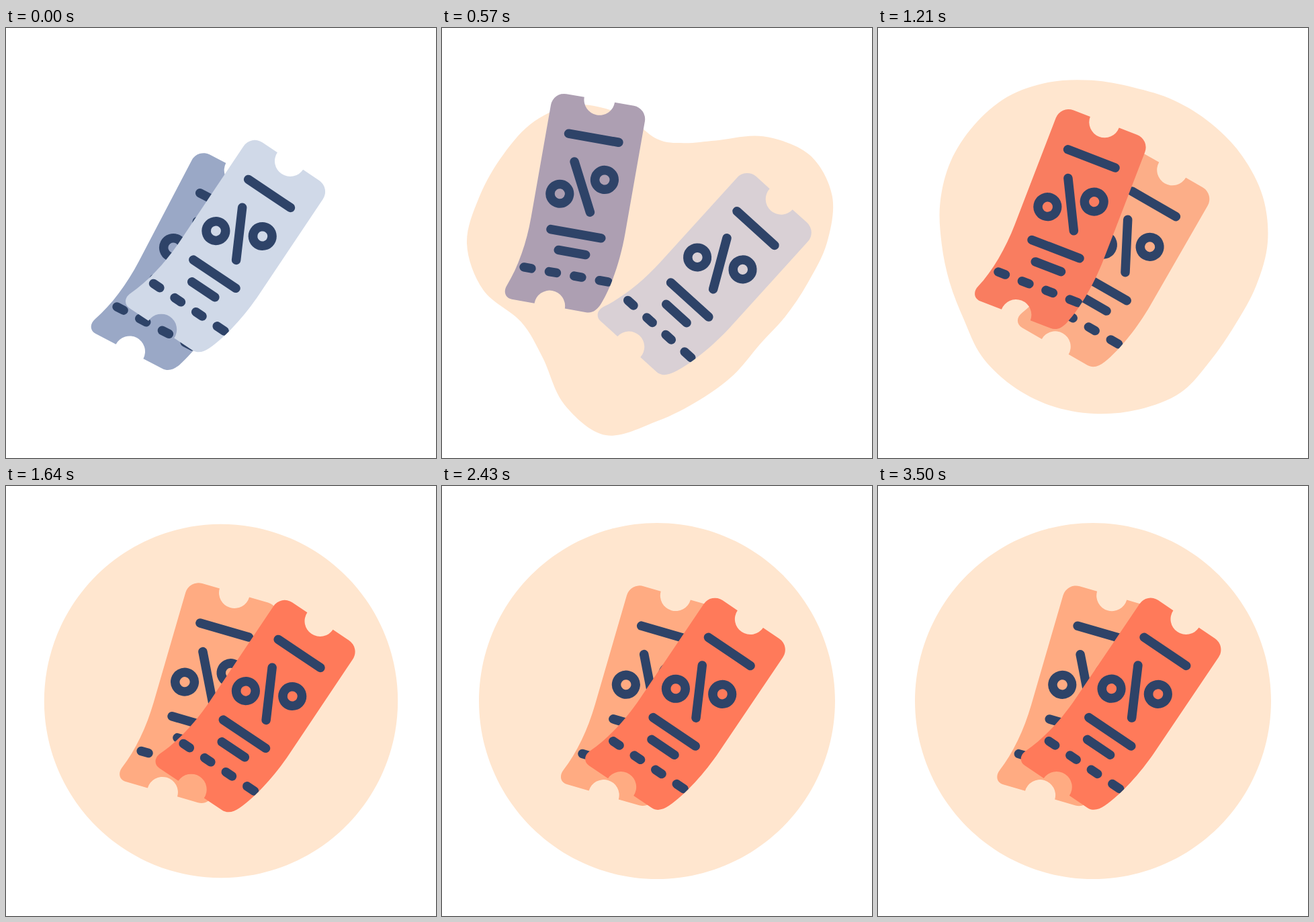
Write an HTML page that moves like this. It is 640 px wide and 640 px high and loops after 3.57 s.

```html
<!DOCTYPE html>
<html lang="en">
<head>
<meta charset="utf-8">
<title>Discount tickets</title>
<style>
  html, body { margin: 0; width: 100%; height: 100%; overflow: hidden; background: #fff; }
  svg { display: block; width: 100%; height: 100%; }
</style>
</head>
<body>
<svg viewBox="0 0 640 640">
  <defs>
    <path id="body" d="M-50 0H-23A23 23 0 0 0 23 0H52A20 20 0 0 1 72 20V190C72 228 66 270 55 298
      C51 308 45 315 35 315H3A23 23 0 0 0 -43 315H-77C-87 315 -92 306 -88 296
      C-76 266 -70 228 -70 190V20A20 20 0 0 1 -50 0Z"/>
    <clipPath id="edge"><use href="#body"/></clipPath>
    <g id="ticket">
      <use href="#body"/>
      <g fill="none" stroke="#2e4368" stroke-width="13.5" stroke-linecap="round">
        <path d="M-36.5 57.5H39M-20.8 97.2L15.2 167.2M-38 202.4H38M-21.5 230.8H19.5"/>
        <circle cx="-34" cy="148" r="14.3"/>
        <circle cx="28" cy="116" r="14.3"/>
        <path clip-path="url(#edge)" d="M-67.6 264.8h11.2M-29.6 264.8h11.2M8.4 264.8h11.2M46.4 264.8h13"/>
      </g>
    </g>
  </defs>
  <path id="blob" fill="#ffe6cf"/>
  <g id="stack">
    <use id="a" href="#ticket"/>
    <use id="b" href="#ticket"/>
  </g>
</svg>
<script>
const LOOP = 3570, STEP = 71.4, SWAP = 785;
const $ = id => document.getElementById(id);
const mix = (a, b, p) => a + (b - a) * p;

// Smooth keyframes [time, ...values] that never swing past a key.
function track(keys) {
  const slope = (i, k) => (keys[i + 1][k] - keys[i][k]) / (keys[i + 1][0] - keys[i][0]);
  const tangent = (i, k) => {
    if (i === 0 || i === keys.length - 1) return 0;
    const s = slope(i - 1, k), e = slope(i, k);
    return s * e <= 0 ? 0 : 2 * s * e / (s + e);
  };
  return t => {
    const last = keys.length - 1;
    if (t >= keys[last][0]) return keys[last].slice(1);
    let i = 0;
    while (t >= keys[i + 1][0]) i++;
    const h = keys[i + 1][0] - keys[i][0];
    const x = (t - keys[i][0]) / h, y = 1 - x;
    return keys[i].slice(1).map((v, j) => {
      const k = j + 1;
      return v * y * y * (1 + 2 * x) + keys[i + 1][k] * x * x * (3 - 2 * x)
        + h * x * y * (tangent(i, k) * y - tangent(i + 1, k) * x);
    });
  };
}

// x, y, angle
const poseA = track([
  [0, 347.7, 211.6, 27.6], [570, 234.6, 107, 10], [785, 214, 88, 7], [1000, 233.6, 104, 9.4],
  [1212, 336.6, 140, 21], [1641, 467.5, 201, 33.8], [2150, 459.2, 198.1, 34], [3200, 458.5, 198, 34]
]);
const poseB = track([
  [0, 423, 198, 33.8], [570, 504.6, 254.6, 42.2], [785, 519, 265, 43.7], [1000, 503.8, 254.2, 42.2],
  [1212, 438.7, 211.6, 30], [1641, 340, 159, 16.2], [2150, 347.5, 163, 16.2], [3200, 348.2, 163.2, 16.2]
]);

// Blob radii every 15 degrees, clockwise from the right.
const N = 24;
const heart = [253, 232, 220, 215, 227, 242, 265, 296, 277, 241, 234, 268,
  283, 273, 264, 257, 238, 198, 155, 154, 176, 224, 262, 270];
const pear = [207, 212, 226, 246, 243, 226, 216, 223, 237, 233, 228, 224,
  221, 205, 170, 163, 172, 195, 223, 232, 229, 214, 206, 202];
const pebble = [260, 251, 244, 247, 258, 257, 254, 250, 244, 236, 223, 221,
  225, 235, 244, 249, 252, 248, 242, 239, 244, 250, 257, 262];
const turned = (list, n) => list.map((_, i) => list[(i - n + N) % N]);
const round = r => Array(N).fill(r);

// scale, turn, radii
const blobTrack = track([
  [0, 0, 20, ...heart],
  [380, 1.03, 12, ...heart],
  [570, 1, 0, ...heart],
  [1000, 1, -60, ...turned(pear, 4)],
  [1212, 1, -120, ...turned(pebble, 8)],
  [1641, 1, -200, ...round(263.2)],
  [2000, 1, -210, ...round(265)]
]);

function blobPath(t) {
  const [scale, turn, ...radii] = blobTrack(t);
  const pts = radii.map((r, i) => {
    const a = (turn + i * 360 / N) * Math.PI / 180;
    return [320 + r * scale * Math.cos(a), 320 + r * scale * Math.sin(a)];
  });
  const at = i => pts[(i + N) % N];
  const handle = (i, dir) => at(i).map((v, k) => v + dir * (at(i + 1)[k] - at(i - 1)[k]) / 6);
  const f = p => p.map(v => v.toFixed(2)).join(" ");
  let d = "M" + f(at(0));
  for (let i = 0; i < N; i++) d += `C${f(handle(i, 1))} ${f(handle(i + 1, -1))} ${f(at(i + 1))}`;
  return d + "Z";
}

function place(el, [x, y, angle], from, to, p) {
  el.setAttribute("transform", `translate(${x} ${y}) rotate(${angle})`);
  el.setAttribute("fill", `rgb(${from.map((v, i) => Math.round(mix(v, to[i], p)))})`);
}

const blob = $("blob"), stack = $("stack"), a = $("a"), b = $("b");

function draw(t) {
  const x = Math.min(1, Math.max(0, (t - 260) / 1120));
  const p = x * x * (3 - 2 * x);
  blob.setAttribute("d", blobPath(t));
  place(a, poseA(t), [154, 168, 198], [255, 122, 90], p);
  place(b, poseB(t), [208, 217, 232], [255, 171, 130], p);
  const front = t < SWAP ? b : a;
  if (stack.lastElementChild !== front) stack.appendChild(front);
}

// The motion runs at 14 pictures a second.
const start = performance.now();
function tick() {
  const t = (performance.now() - start) % LOOP;
  draw(Math.floor((t + 5) / STEP) % 50 * STEP);
  requestAnimationFrame(tick);
}
draw(0);
requestAnimationFrame(tick);
</script>
</body>
</html>
```
